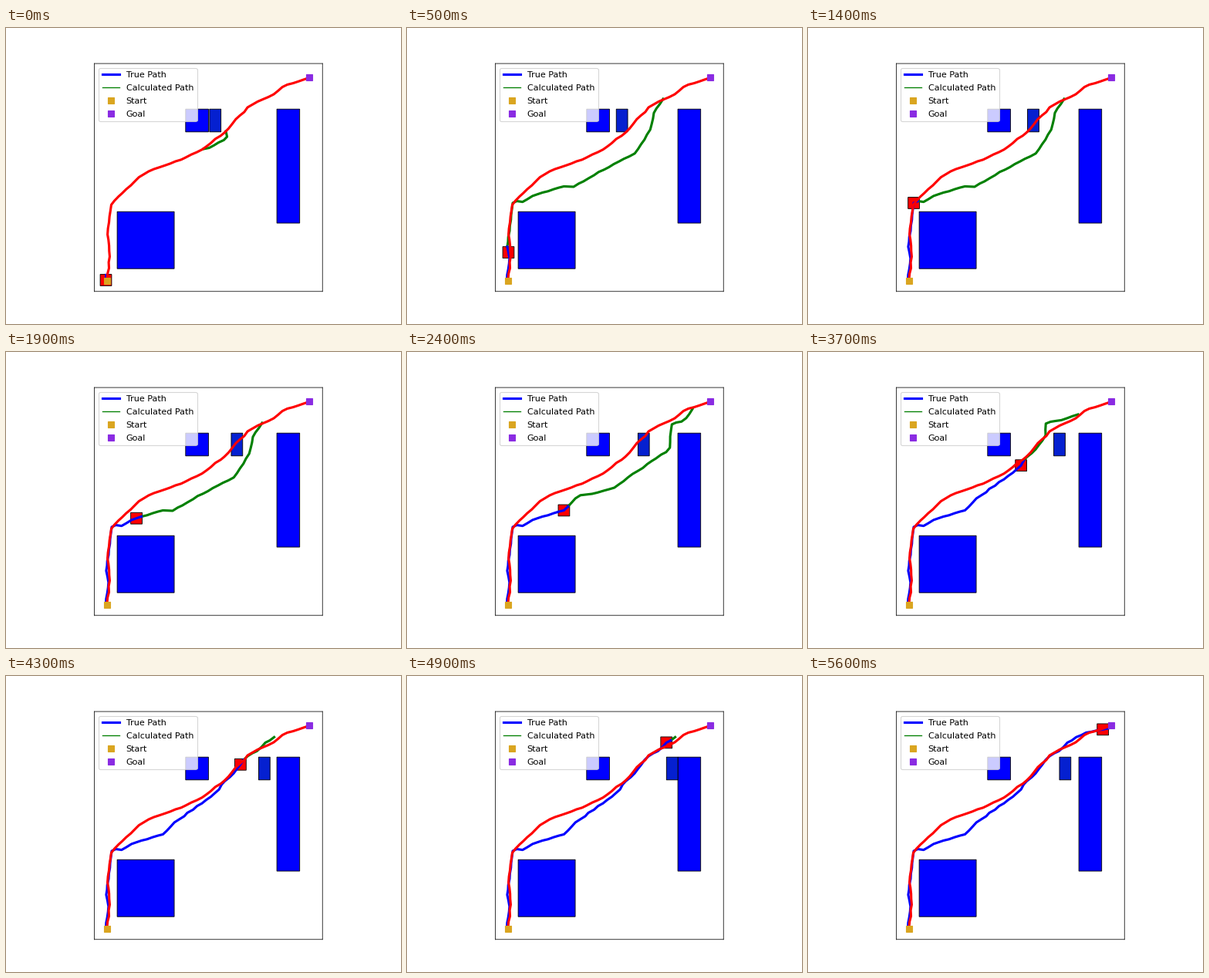
Animation, 512 px wide and 384 px high, one loop 5700 ms. Source, as a matplotlib script:

```python
import numpy as np
import matplotlib.pyplot as plt
from matplotlib.animation import FuncAnimation
from matplotlib.lines import Line2D
from matplotlib.patches import Rectangle

W, H, DPI = 512, 384, 80
FRAMES, INTERVAL = 57, 100
LEFT, BOTTOM, SIDE = 114.56, 341.76, 295.68
UNIT = SIDE / 20
TURN = 49  # step at which the moving obstacle meets the wall

rng = np.random.default_rng(4)
fig = plt.figure(figsize=(W / DPI, H / DPI), dpi=DPI, facecolor="white")
ax = fig.add_axes([LEFT / W, 1 - BOTTOM / H, SIDE / W, SIDE / H])
ax.set(xlim=(LEFT, LEFT + SIDE), ylim=(BOTTOM, BOTTOM - SIDE),
       xticks=[], yticks=[])
for spine in ax.spines.values():
    spine.set(snap=False, linewidth=0.7)


def block(x, y, w, h, color="blue"):
    """Rectangle given in world units, lower left corner first."""
    return ax.add_patch(Rectangle(
        (LEFT + x * UNIT, BOTTOM - (y + h) * UNIT), w * UNIT, h * UNIT,
        facecolor=color, edgecolor="black", linewidth=0.8, snap=False))


def walk(keys, count=None, jitter=0.4):
    """Even steps of half a unit along the key points, slightly uneven."""
    keys = np.array(keys, float)
    dist = np.r_[0, np.cumsum(np.hypot(*np.diff(keys, axis=0).T))]
    count = count or round(dist[-1] / (UNIT / 2)) + 1
    at = np.linspace(0, dist[-1], count)
    points = np.column_stack([np.interp(at, dist, k) for k in keys.T])
    points[1:-1] += rng.normal(0, jitter, (count - 2, 2))
    return points


def path(color, z):
    return ax.plot([], [], color=color, lw=2.8, zorder=z)[0]


def square(color, label, at=((), ())):
    return Line2D(*at, color=color, marker="s", ms=6.5, ls="none",
                  zorder=4, label=label)


PLAN = walk([(131, 326), (135, 294), (132, 269), (136, 229), (154, 211),
             (176, 190.5), (190, 184), (226, 171), (256, 156.5), (285, 134),
             (314, 102), (344, 88), (360, 75), (393, 64.5)])

# One point per step, so the robot moves at constant speed
TRACK = walk([(129.5, 327), (133, 298), (129.5, 283.5), (137, 226), (151, 225),
              (163, 217.5), (204.5, 205), (219, 189.5), (233, 180),
              (275.5, 148.5), (279, 141), (296, 125.5), (313, 103),
              (327, 96.5), (336, 87), (360, 73), (389, 68)], FRAMES + 1)

# First step, step where the detour leaves the track, detour
REPLANS = [
    (0, 0, walk([(256, 157), (270, 152), (287, 143), (285, 134)])),
    (5, 25, walk([(216, 206), (267, 177), (296, 162), (317, 129), (318, 113),
                  (332, 92)])),
    (24, 29, walk([(240, 184), (267, 177), (310, 146), (340, 127), (343, 93),
                   (359, 90), (370, 74)])),
    (28, 41, TRACK[:0]),
    (37, 44, walk([(308, 108), (308, 92), (333, 87), (350, 81)])),
    (43, 52, TRACK[:0]),
]

block(2, 2, 5, 5)
block(16, 6, 2, 10)
block(8, 14, 2, 2)
mover = block(10.1, 14, 1, 2, "#0520d0")
robot = block(0.5, 0.5, 1, 1, "red")

calc_line = path("green", 2)
true_line = path("blue", 2.1)
plan_line = path("red", 2.2)
plan_line.set_data(*PLAN.T)

ax.legend(handles=[
    Line2D([], [], color="blue", lw=2.8, label="True Path"),
    Line2D([], [], color="green", lw=1.2, label="Calculated Path"),
    square("goldenrod", "Start"),
    square("blueviolet", "Goal"),
], loc="upper left", fontsize=10, labelspacing=0.62, framealpha=0.8)
ax.add_line(square("goldenrod", "", ([131.2], [328])))
ax.add_line(square("blueviolet", "", ([393.4], [64.2])))


def update(n):
    robot.set_xy(TRACK[n] - UNIT / 2)
    mover.set_x(LEFT + UNIT * (15 - 0.1 * abs(TURN - n)))
    true_line.set_data(*TRACK[:n + 2].T)
    _, leave, detour = [r for r in REPLANS if r[0] <= n][-1]
    calc_line.set_data(*np.vstack([TRACK[n + 1:leave], detour]).T)
    return mover, robot, true_line, calc_line


anim = FuncAnimation(fig, update, frames=FRAMES, interval=INTERVAL,
                     repeat=True, repeat_delay=0, blit=False)
plt.show()
```
